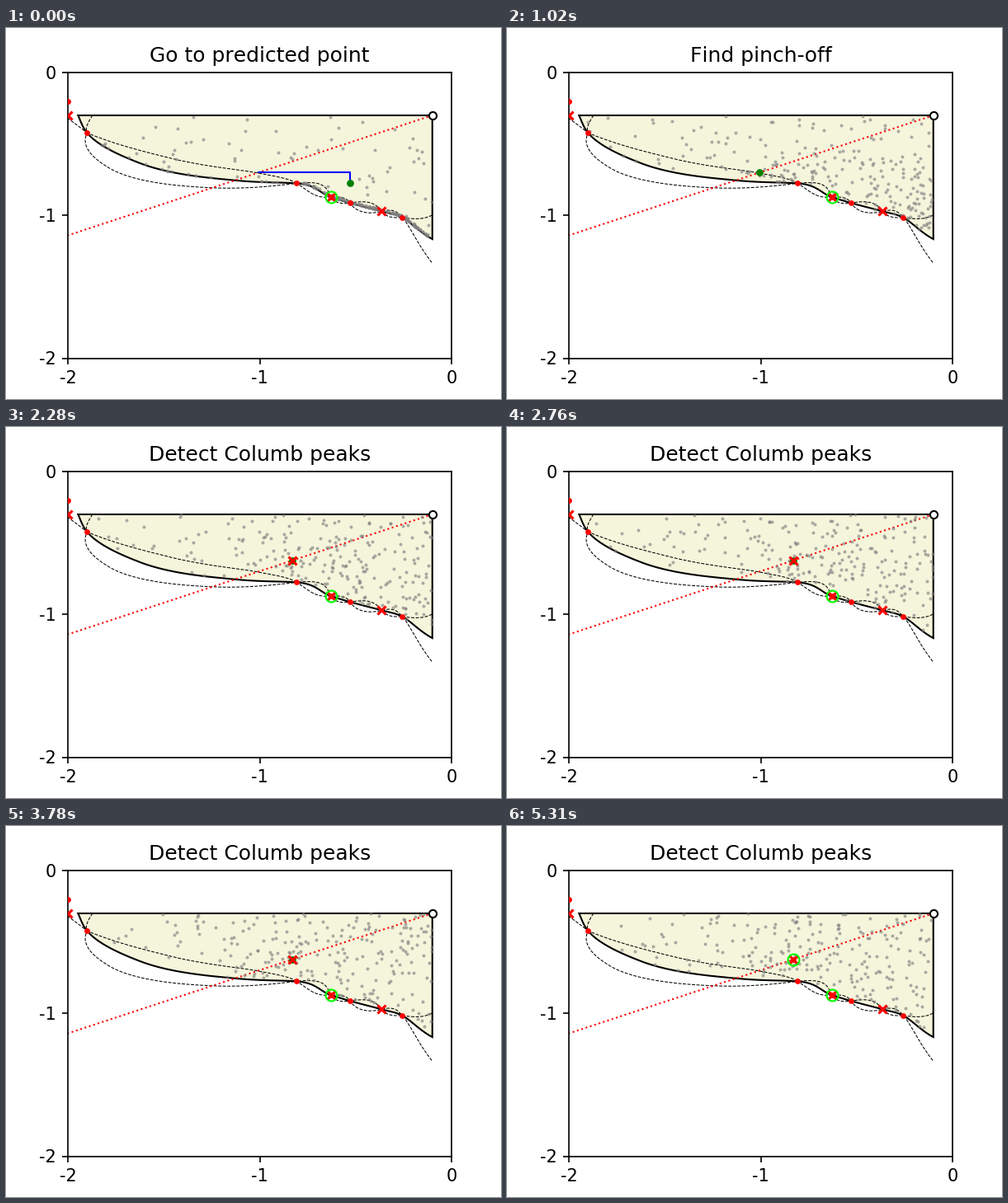
These frames come from a looping animation (600x450 px, 6240 ms). A matplotlib script:

```python
import numpy as np
import matplotlib.pyplot as plt
from matplotlib.animation import FuncAnimation

plt.rcParams.update({"font.family": "DejaVu Sans",
                     "axes.unicode_minus": False,
                     "text.kerning_factor": 6})

FRAMES, INTERVAL = 208, 30
ARRIVE, FIND, DETECT, DONE = 26, 33, 61, 177
ORIGIN = np.array([-0.1, -0.3])

# The boundary is a radius around ORIGIN; angles are degrees below -x.
KEY_ANGLE = np.array([0, 3.9, 12.4, 23.85, 33.9, 47.3, 55.1, 68.5, 77.4, 90])
KEY_RADIUS = np.array([1.847, 1.804, 1.56, 1.125, 0.853,
                       0.779, 0.748, 0.722, 0.731, 0.866])
OBSERVED = np.delete(KEY_ANGLE, [0, 2, 3, 9])
SLOPE = np.gradient(KEY_RADIUS, KEY_ANGLE)


def ray(angle, radius):
    a = np.radians(angle)
    return ORIGIN - np.stack([radius * np.cos(a), radius * np.sin(a)], -1)


def polar(points):
    dx, dy = (ORIGIN - points).T
    return np.degrees(np.arctan2(dy, dx)), np.hypot(dx, dy)


def mean(angle):
    """Cubic Hermite curve through the key radii."""
    i = np.clip(np.searchsorted(KEY_ANGLE, angle) - 1, 0, len(KEY_ANGLE) - 2)
    h = KEY_ANGLE[i + 1] - KEY_ANGLE[i]
    t = (angle - KEY_ANGLE[i]) / h
    blend = t * t * (3 - 2 * t)
    return (KEY_RADIUS[i] * (1 - blend) + KEY_RADIUS[i + 1] * blend
            + h * t * (1 - t) * (SLOPE[i] * (1 - t) - SLOPE[i + 1] * t))


def spread(angle):
    """Relative uncertainty: zero at observations, wider in longer gaps."""
    i = np.clip(np.searchsorted(OBSERVED, angle), 1, len(OBSERVED) - 1)
    a, b = angle - OBSERVED[i - 1], OBSERVED[i] - angle
    inside = 0.0103 * a * b / (a + b) ** 0.85
    outside = 0.0067 * np.abs(np.minimum(a, b)) ** 1.33
    return np.where((a >= 0) & (b >= 0), inside, outside)


ANGLES = np.linspace(0, 90, 361)
RADII = mean(ANGLES)

AIM = 23.85
PREDICTED, PEAK = ray(AIM, 0.989), ray(AIM, 0.797)
START = np.array([-0.528, -0.775])
PATH = np.array([START, [START[0], PREDICTED[1]], PREDICTED])


def along_path(u):
    leg = np.hypot(*np.diff(PATH, axis=0).T)
    s = np.r_[0, np.cumsum(leg)]
    return np.array([np.interp(u * s[-1], s, PATH[:, k]) for k in (0, 1)])


def probe(i):
    if i < FIND:
        return along_path(min(i / ARRIVE, 1))
    u = np.clip((i - FIND - 1) / (DETECT - FIND - 2), 0, 1)
    return PREDICTED + u * (PEAK - PREDICTED)


def inside(points):
    angle, radius = polar(points)
    return (angle > 0) & (angle < 90) & (radius < mean(angle))


def start_points(rng):
    box = rng.uniform([-1.95, -1.17], ORIGIN, (900, 2))
    inner = box[inside(box)][:60]
    angle = np.r_[rng.uniform(33, 89, 150), rng.uniform(4, 33, 16)]
    rim = ray(angle, mean(angle) - rng.uniform(0, 0.014, angle.size))
    return np.vstack([rim, inner])


def walk():
    """Random walk of the samples, confined to the region."""
    rng = np.random.default_rng(8)
    pos = start_points(rng)
    pulled = np.arange(len(pos)) % 12 == 0
    steps = [pos]
    for i in range(1, DONE + 1):
        move = rng.normal(0, 0.045, pos.shape)
        move[pulled] += 0.12 * (probe(i) - pos[pulled])
        pos = np.where(inside(pos + move)[:, None], pos + move, pos)
        steps.append(pos)
    return steps


samples = walk()

fig, ax = plt.subplots(figsize=(4, 3), dpi=150)
ax.set(xlim=(-2, 0), ylim=(-2, 0), xticks=[-2, -1, 0], yticks=[-2, -1, 0])
title = ax.set_title("")

outline = np.vstack([ray(ANGLES, RADII), ORIGIN])
ax.fill(*outline.T, facecolor="beige", edgecolor="black", lw=1, zorder=1)
for side in (-1, 1):
    band = ray(ANGLES, RADII * (1 + side * spread(ANGLES)))
    ax.plot(*band.T, "k--", lw=0.5, zorder=2)
beam = np.array([ORIGIN, ray(AIM, 1.9 / np.cos(np.radians(AIM)))])
ax.plot(*beam.T, "r:", lw=1, zorder=2)
path_line, = ax.plot(*PATH.T, color="blue", lw=1, zorder=2.2)
cloud, = ax.plot([], [], "o", color="gray", ms=1.9, mew=0, alpha=0.65,
                 zorder=2.1)


def marks(points, style, **kw):
    return ax.plot(*np.transpose(points), style, zorder=3, **kw)[0]


CROSS = dict(color="red", ms=4.4, mew=1.5)
DOT = dict(color="red", ms=3.3, mew=0)
RING = dict(mfc="none", mec="lime", ms=6.7, mew=1)

found = ray(OBSERVED, mean(OBSERVED))
old_peak, pinch = found[2], found[4]
marks(np.vstack([np.delete(found, 4, axis=0), [-2, -0.2]]), "o", **DOT)
marks([(-2, -0.3), old_peak, pinch], "x", **CROSS)
marks([old_peak], "o", **RING)
marks([ORIGIN], "o", mfc="white", mec="black", ms=4.4, mew=1)

green = marks([START], "o", color="green", ms=4.2, mew=0)
peak_dot = marks([PEAK], "o", **DOT)
peak_cross = marks([PEAK], "x", **CROSS)
peak_ring = marks([PEAK], "o", **RING)


def draw(i):
    if i < FIND:
        title.set_text("Go to predicted point")
    elif i < DETECT:
        title.set_text("Find pinch-off")
    else:
        title.set_text("Detect Columb peaks")
    path_line.set_visible(i < FIND)
    green.set_visible(i < DONE)
    green.set_data(*probe(i)[:, None])
    peak_cross.set_visible(i >= DETECT)
    peak_dot.set_visible(i >= DONE)
    peak_ring.set_visible(i >= DONE)
    cloud.set_data(*samples[min(i, DONE)].T)
    return []


anim = FuncAnimation(fig, draw, frames=FRAMES, interval=INTERVAL,
                     repeat=True, repeat_delay=0)
plt.show()
```
